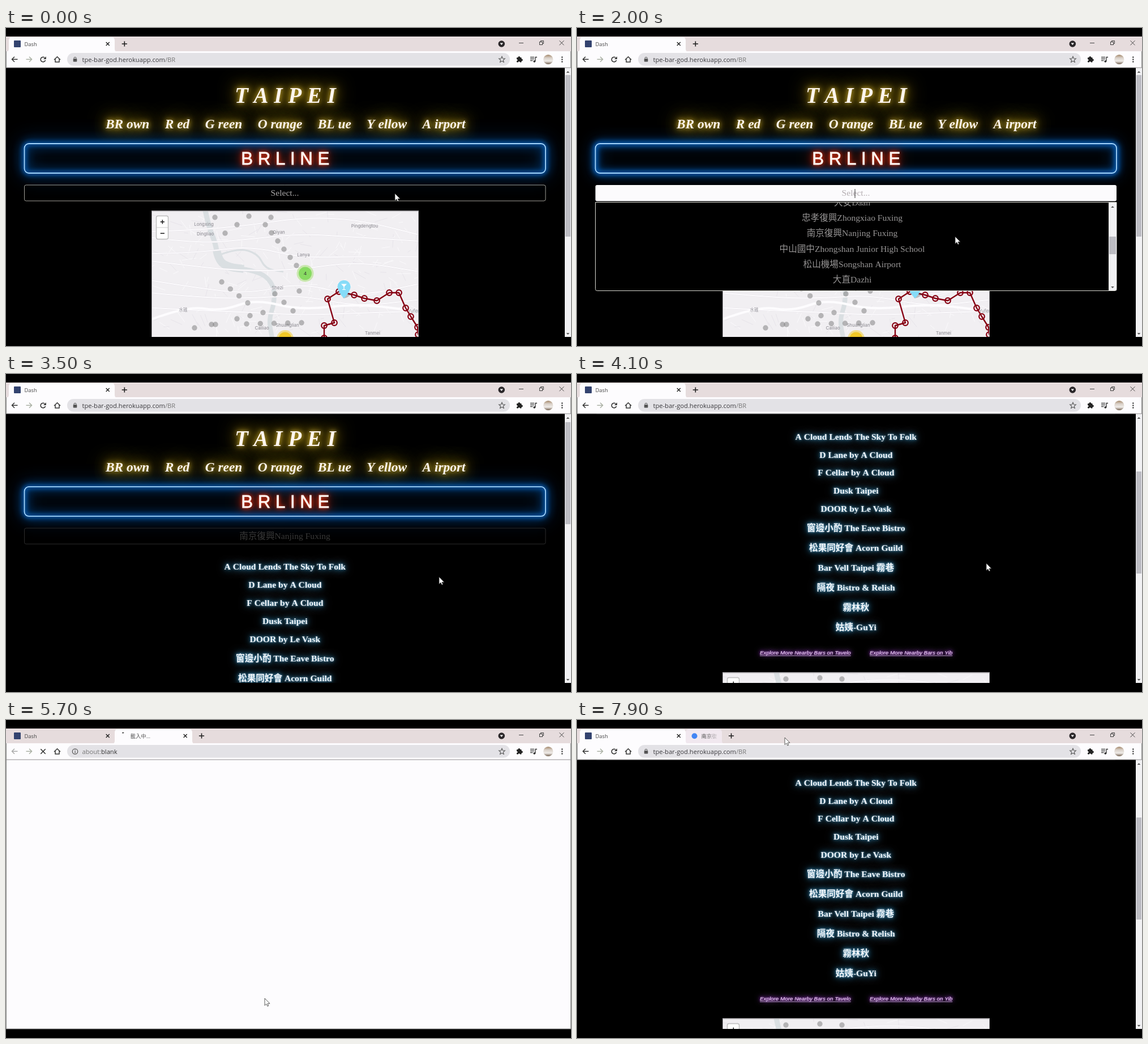
Animation of 998x561 px, one loop 8000 ms. Source, as an HTML page with a canvas:

```html
<!DOCTYPE html>
<html lang="zh-Hant">
<head>
<meta charset="utf-8">
<title>Dash</title>
<style>
html, body { margin: 0; width: 100%; height: 100%; overflow: hidden; background: #000; }
canvas { display: block; width: 998px; height: 561px; }
</style>
</head>
<body>
<canvas id="stage" width="998" height="561"></canvas>
<script>
const stage = document.getElementById('stage').getContext('2d');
let c = stage;

const LOOP = 8000;
const OPEN = 500, PICK = 2400, LISTED = 3000, NEW_TAB = 5550, LOADED = 6500, CLOSE_TAB = 7800;
const CJK = '"Noto Sans CJK TC", "Noto Sans CJK JP", "Noto Sans CJK", sans-serif';
const SERIF = '"Liberation Serif", ' + CJK;
const UI = '"Open Sans", ' + CJK;
const MID = 493.3, ROW = 27.3, MENU_TOP = 308;

const stations = ['動物園Taipei Zoo', '木柵Muzha', '萬芳社區Wanfang Community', '萬芳醫院Wanfang Hospital',
  '辛亥Xinhai', '麟光Linguang', '六張犁Liuzhangli', '科技大樓Technology Building', '大安Daan',
  '忠孝復興Zhongxiao Fuxing', '南京復興Nanjing Fuxing', '中山國中Zhongshan Junior High School',
  '松山機場Songshan Airport', '大直Dazhi', '劍南路Jiannan Rd.', '西湖Xihu', '港墘Gangqian', '文德Wende',
  '內湖Neihu', '大湖公園Dahu Park', '葫洲Huzhou', '東湖Donghu', '南港軟體園區Nangang Software Park',
  '南港展覽館Taipei Nangang Exhibition Center'];
const bars = ['A Cloud Lends The Sky To Folk', 'D Lane by A Cloud', 'F Cellar by A Cloud', 'Dusk Taipei',
  'DOOR by Le Vask', '窗邊小酌 The Eave Bistro', '松果同好會 Acorn Guild', 'Bar Vell Taipei 霧巷',
  '隔夜 Bistro & Relish', '霧林秋', '姑姨-GuYi'];
const lines = ['BR own', 'R ed', 'G reen', 'O range', 'BL ue', 'Y ellow', 'A irport'];

const GOLD = [[34, '#c8a000'], [20, '#c8a000'], [9, '#d8b838']];
const RED = [[26, '#e02000'], [14, '#ff2a08'], [6, '#ff3a14']];
const BLUE = [[15, '#0e6a9c'], [8, '#2f7ea8'], [3, '#6fa6c4']];
const PURPLE = [[11, '#9010d0'], [6, '#b040e8'], [3, '#b858e0']];

// Pointer moves: start, end, x, y
const moves = [[550, 900, 668, 368], [2500, 3350, 765, 358], [3550, 4100, 723, 334],
  [4400, 5300, 457, 491], [6600, 7600, 318, 30], [7720, 7900, 367, 31]];

function ease(t, from, to) {
  const u = Math.min(1, Math.max(0, (t - from) / (to - from)));
  return u * u * (3 - 2 * u);
}

// Sum of smooth wheel notches, 200 ms each
const wheel = (t, step, times) => times.reduce((sum, s) => sum + step * ease(t, s, s + 200), 0);
const menuScroll = t => wheel(t, 77.5, [1000, 1350, 1700]);
const pageScroll = t => wheel(t, 78.3, [3470, 3670, 3870]);

function rect(x, y, w, h, fill) { c.fillStyle = fill; c.fillRect(x, y, w, h); }

function round(x, y, w, h, r, fill, stroke, lw = 1) {
  c.beginPath(); c.roundRect(x, y, w, h, r);
  if (fill) { c.fillStyle = fill; c.fill(); }
  if (stroke) { c.strokeStyle = stroke; c.lineWidth = lw; c.stroke(); }
}

function disc(x, y, r, fill) { c.beginPath(); c.arc(x, y, r, 0, 7); c.fillStyle = fill; c.fill(); }

function arc(x, y, r, from, to, color, lw) {
  c.beginPath(); c.arc(x, y, r, from, to); c.strokeStyle = color; c.lineWidth = lw; c.stroke();
}

function line(color, lw, ...p) {
  c.beginPath();
  for (let i = 0; i < p.length; i += 2) c.lineTo(p[i], p[i + 1]);
  c.strokeStyle = color; c.lineWidth = lw; c.stroke();
}

function poly(fill, ...p) {
  c.beginPath();
  for (let i = 0; i < p.length; i += 2) c.lineTo(p[i], p[i + 1]);
  c.closePath(); c.fillStyle = fill; c.fill();
}

// Smooth line through a few points
function bend(color, lw, ...p) {
  c.beginPath(); c.moveTo(p[0], p[1]);
  let i = 2;
  for (; i < p.length - 2; i += 2)
    c.quadraticCurveTo(p[i], p[i + 1], (p[i] + p[i + 2]) / 2, (p[i + 1] + p[i + 3]) / 2);
  c.lineTo(p[i], p[i + 1]);
  c.strokeStyle = color; c.lineWidth = lw; c.stroke();
}

function text(s, x, y, font, fill, align = 'left') {
  c.font = font; c.textAlign = align; c.fillStyle = fill; c.fillText(s, x, y);
}

// Draws only the shadows of a shape: the shape itself is moved off the stage
function halo(list, paint) {
  c.save();
  c.shadowOffsetX = 2000;
  c.translate(-2000, 0);
  for (const [blur, color] of list) { c.shadowBlur = blur; c.shadowColor = color; paint(); }
  c.restore();
}

function glow(s, x, y, font, fill, align, list) {
  halo(list, () => text(s, x, y, font, '#fff', align));
  text(s, x, y, font, fill, align);
}

function cross(x, y, r, color, lw) {
  line(color, lw, x - r, y - r, x + r, y + r);
  line(color, lw, x + r, y - r, x - r, y + r);
}

function plus(x, y, r, lw) {
  line('#222', lw, x - r, y, x + r, y);
  line('#222', lw, x, y - r, x, y + r);
}

function drawMap() {
  const img = document.createElement('canvas');
  img.width = 472; img.height = 223;
  c = img.getContext('2d');
  c.translate(-257, -322);
  c.lineJoin = 'round';
  rect(257, 322, 472, 223, '#f1eff2');
  let seed = 11;
  const rnd = () => (seed = seed * 16807 % 2147483647) / 2147483647;
  for (let i = 0; i < 260; i++) {
    const x = 257 + rnd() * 472, y = 325 + rnd() * 220, a = rnd() * 6.3, l = 6 + rnd() * 20;
    line(i % 3 ? '#fbfafc' : '#e7e4ea', 1, x, y, x + Math.cos(a) * l, y + Math.sin(a) * l);
  }
  const water = '#dadfe2';
  bend(water, 9, 352, 322, 358, 350, 370, 380, 374, 405);
  bend(water, 14, 372, 392, 376, 412, 395, 422, 420, 425);
  bend(water, 8, 405, 423, 445, 428, 472, 450, 475, 482, 464, 515, 470, 546);
  bend(water, 3, 378, 400, 410, 388, 445, 398, 458, 425, 490, 430);
  for (let i = 0; i < 7; i++) {
    const y = 345 + i * 28, w = () => y + rnd() * 40 - 20;
    const road = [257, w(), 340, w(), 430, w(), 520, w(), 620, w(), 730, w()];
    bend('#e6e2e8', 3, ...road); bend('#fcfbfd', 2, ...road);
  }
  bend('#fdfcfe', 4, 257, 514, 320, 490, 380, 500, 440, 478, 520, 498, 620, 486, 730, 500);

  const label = (s, x, y) => text(s, x, y, '500 7.8px Inter, ' + CJK, '#95939a', 'center');
  label('Longxing', 349.5, 349); label('Dingliao', 352, 366); label('Qiyan', 482, 363);
  label('Lanya', 525.5, 403); label('Shezi', 479.5, 461); label('Pingdengtou', 633.5, 352);
  label('水碓', 313, 500); label('Cailiao', 452, 532); label('Shuanglian', 497, 527);
  label('Tanmei', 647.5, 541); label('Yufeng', 723, 502);

  // Evenly spaced stops between two points
  const chain = (n, x0, y0, x1, y1) => {
    for (let i = 0; i < n; i++) {
      const u = i / (n - 1);
      disc(x0 + (x1 - x0) * u, y0 + (y1 - y0) * u, 4.7, 'rgba(120,120,120,.5)');
    }
  };
  chain(2, 369, 334, 468, 334);
  chain(3, 387, 362, 429, 332);
  chain(6, 458, 347, 513, 419);
  chain(4, 381, 448, 427, 485);
  chain(3, 454, 502, 408, 513);
  chain(3, 475, 469, 507, 499);
  chain(2, 333, 529, 518, 464);
  chain(2, 363, 523, 370, 523);
  chain(5, 425, 522, 522, 520);

  const track = [562, 547, 562, 525, 580, 520, 568, 478, 588, 465, 615, 471, 633, 477, 655, 481, 677, 467,
    694, 467, 706, 494, 715, 509, 727, 528, 728, 541];
  line('#860012', 2.4, ...track);
  for (let i = 0; i < track.length; i += 2) arc(track[i], track[i + 1], 4.8, 0, 7, '#860012', 2.2);

  const cluster = (x, y, outer, inner) => { disc(x, y, 15, outer); disc(x, y, 11.5, inner); };
  cluster(528.5, 433, 'rgba(181,226,140,.65)', 'rgba(125,216,85,.85)');
  text('4', 528.5, 436, '9px "Liberation Sans", sans-serif', '#333', 'center');
  cluster(493, 548, 'rgba(241,211,87,.65)', 'rgba(240,194,12,.8)');

  c.beginPath(); c.ellipse(602, 472, 8, 3, -.5, 0, 7); c.fillStyle = 'rgba(0,0,0,.22)'; c.fill();
  c.beginPath(); c.arc(597, 456.5, 11.5, Math.PI * .87, Math.PI * .13);
  c.quadraticCurveTo(605, 469, 597, 477); c.quadraticCurveTo(589, 469, 586.4, 461);
  c.fillStyle = '#86dcf8'; c.fill();
  poly('#fff', 592, 451.5, 602, 451.5, 597, 457);
  rect(596.4, 456, 1.2, 5, '#fff'); rect(594, 461, 6, 1, '#fff');

  round(265.5, 331.5, 21, 41, 3, '#fff', '#bcbcbc', 1.4);
  line('#ccc', 1, 266, 352, 286, 352);
  plus(276.3, 342, 3.6, 1.6);
  line('#222', 1.6, 272.7, 362.3, 279.9, 362.3);
  line('#a4a2a6', 2, 257, 546, 257, 322.5, 729, 322.5, 729, 546);
  c = stage;
  return img;
}

const mapImage = drawMap();

function drawScrollbar(x, y, w, h, top, len) {
  rect(x, y, w, h, '#f1f1f3');
  rect(x + 1, top, w - 2, len, '#bdbdc3');
  const m = x + w / 2;
  poly('#555', m - 2.8, y + 9, m + 2.8, y + 9, m, y + 6);
  poly('#555', m - 2.8, y + h - 7, m + 2.8, y + h - 7, m, y + h - 4);
}

function drawMenu(t) {
  const s = menuScroll(t);
  round(32.5, 277, 920.5, 28.5, 3, '#fcfbfd');
  text('Select...', 492.5, 296, '15.6px ' + SERIF, '#b5aeb2', 'center');
  if (t >= 600 && Math.floor((t - 600) / 500) % 2 === 0) rect(490.5, 284, 1, 16, '#333');
  round(32.5, 307.5, 920.5, 156, [0, 0, 3, 3], '#000', '#d8d8d0');
  c.save();
  c.beginPath(); c.rect(33, MENU_TOP, 906, 155); c.clip();
  const hover = t > 800 && t < 1250 ? 2 : t > 2200 ? 10 : -1;
  stations.forEach((name, i) => {
    const y = MENU_TOP + i * ROW - s;
    if (i === hover) rect(33, y, 906, ROW, '#434343');
    text(name, 486, y + 18.8, '15.6px ' + SERIF, i === hover ? '#b4b2b2' : '#969494', 'center');
  });
  c.restore();
  drawScrollbar(939, 308, 14, 155, 322 + s * .198, 31);
}

function drawHeader(t, open, picked) {
  const pulse = .5 + .5 * Math.cos(t / 3000 * Math.PI * 2);
  glow('T A I P E I', MID, 132.3, 'italic bold 39px ' + SERIF, '#fff6ee', 'center', GOLD);
  const font = 'italic bold 23.4px ' + SERIF;
  let x = 176;
  for (const name of lines) {
    glow(name, x, 177, font, '#fff6ee', 'left', GOLD);
    x += c.measureText(name).width + 27.4;
  }
  const size = .75 + .4 * pulse;
  halo([[30 * size, '#0070e0'], [16 * size, '#0078f0'], [8, '#0a86ff']],
    () => round(32.5, 204, 920.5, 52, 8, null, '#fff', 4));
  round(32.5, 204, 920.5, 52, 8, null, '#a4d4fc', 1.8);
  const sign = '31.2px "Liberation Sans", sans-serif';
  glow('B R L I N E', MID, 241, sign, '#fff4f0', 'center', RED);
  c.strokeStyle = '#fff4f0'; c.lineWidth = .8;
  c.strokeText('B R L I N E', MID, 241);

  if (open) return drawMenu(t);
  round(32.5, 277, 920.5, 28, 3, null, picked ? '#2c2c2c' : '#a09f98');
  text(picked ? stations[10] : 'Select...', 492.5, 296, '15.6px ' + SERIF, picked ? '#383838' : '#a9a7a7', 'center');
}

function drawBars() {
  bars.forEach((name, i) => {
    const y = i < 5 ? 350.5 + i * 31.9 : 512.3 + (i - 5) * 34.85;
    glow(name, MID - .5, y, 'bold 15.6px ' + SERIF, '#f2f6fa', 'center', BLUE);
  });
  const link = (s, x) => {
    glow(s, x, 730, 'italic 9.84px "Liberation Sans", sans-serif', '#f6e6fa', 'left', PURPLE);
    rect(x, 731.5, c.measureText(s).width, .8, '#e4c4f4');
  };
  link('Explore More Nearby Bars on Tavelo', 323);
  link('Explore More Nearby Bars on Yib', 517);
}

function drawPage(t) {
  rect(0, 70, 987, 475, '#000');
  const listed = t >= LISTED, picked = t >= PICK, open = t >= OPEN && !picked;
  const s = pageScroll(t);
  c.save();
  c.beginPath(); c.rect(0, 70, 987, 475); c.clip();
  c.translate(0, -s);
  c.drawImage(mapImage, 257, listed ? 761 : 322);
  if (open) rect(250, 300, 500, 164, '#000');
  drawHeader(t, open, picked);
  if (listed) drawBars();
  c.restore();
  drawScrollbar(987, 70, 11, 475, 83 + s * .379, listed ? 180 : 285);
}

function tabShape(x, w, fill) {
  c.beginPath();
  c.moveTo(x - 5, 42); c.quadraticCurveTo(x, 42, x, 37); c.lineTo(x, 22);
  c.quadraticCurveTo(x, 16, x + 6, 16); c.lineTo(x + w - 6, 16);
  c.quadraticCurveTo(x + w, 16, x + w, 22); c.lineTo(x + w, 37);
  c.quadraticCurveTo(x + w, 42, x + w + 5, 42);
  c.fillStyle = fill; c.fill();
}

function drawTabs(t, blank) {
  rect(0, 15, 998, 27, '#e6dcdd');
  const closing = t >= CLOSE_TAB;
  const extra = t < NEW_TAB ? 0 : 137 - 73 * Math.min(1, Math.max(0, (t - CLOSE_TAB) / 100));
  if (extra) tabShape(192, extra, closing ? '#f1e8ef' : '#fdfcfe');
  if (!blank) tabShape(5, 187, '#fdfcfe');
  round(14, 22, 12, 12, 1, '#33436f');
  text('Dash', 32.5, 31.6, '9.4px ' + UI, '#444');
  cross(179.7, 28, 3, '#222', 1.4);
  if (extra) {
    if (t < LOADED) {
      const a = -1.9 + (t - 5700) / 160;
      arc(207, 28, 5.5, a, a + .55, '#222', 1.5);
    } else disc(207.5, 28.3, 5, '#4285f4');
    const end = 184 + extra;
    c.save();
    c.beginPath(); c.rect(219, 18, end - 219, 20); c.clip();
    const fade = c.createLinearGradient(end - 18, 0, end, 0);
    fade.addColorStop(0, '#555'); fade.addColorStop(1, 'rgba(85,85,85,.1)');
    text(t < LOADED ? '載入中...' : '南京復興', 219.5, 31.6, '9.4px ' + UI, fade);
    c.restore();
    if (!closing) cross(316.7, 28, 3, '#222', 1.4);
  }
  plus(extra ? 208.5 + extra : 209.3, 28, 4.6, 1.6);
  disc(875.3, 28, 5.8, '#2a2729');
  poly('#fff', 872.5, 26.6, 878.1, 26.6, 875.3, 30);
  line('#444', 1, 906, 26.5, 914, 26.5);
  c.strokeStyle = '#444'; c.lineWidth = 1;
  c.strokeRect(942.5, 24.5, 5, 5);
  line('#444', 1, 944.5, 24, 944.5, 22.5, 949.5, 22.5, 949.5, 27.5, 948, 27.5);
  cross(981.5, 26.3, 4, '#444', 1);
}

function arrow(x, dir, color) {
  line(color, 1.5, x - 5 * dir, 55.3, x + 5 * dir, 55.3);
  line(color, 1.5, x + .5 * dir, 50.8, x + 5 * dir, 55.3, x + .5 * dir, 59.8);
}

function drawToolbar(blank) {
  rect(0, 41, 998, 29, '#fdfcfe');
  arrow(15.5, -1, blank ? '#aaa' : '#333');
  arrow(40.5, 1, '#aab0a4');
  if (blank) cross(65.5, 55.5, 4.2, '#333', 1.6);
  else {
    arc(65.5, 55.5, 4.3, .3, 5.4, '#333', 1.6);
    poly('#333', 70.8, 50.3, 70.8, 55, 66, 55);
  }
  line('#333', 1.5, 85, 56, 90.5, 50.8, 96, 56);
  line('#333', 1.5, 87, 54.6, 87, 60, 94, 60, 94, 54.6);
  round(108, 44, 782, 22.6, 11.3, '#e3e2e6');
  const font = '11.15px ' + UI;
  const [head, tail] = blank ? ['about:', 'blank'] : ['tpe-bar-god.herokuapp.com', '/BR'];
  text(head, 134.5, 59.5, font, blank ? '#777' : '#3c3b3f');
  text(tail, 134.5 + c.measureText(head).width, 59.5, font, blank ? '#333' : '#777');
  if (blank) {
    arc(122, 55.5, 4.7, 0, 7, '#555', 1.2);
    rect(121.4, 55, 1.3, 3.2, '#555'); rect(121.4, 52.6, 1.3, 1.3, '#555');
  } else {
    round(118.7, 54, 6.6, 5.6, .8, '#555');
    arc(122, 53.5, 2, Math.PI, 0, '#555', 1.1);
  }
  c.beginPath();
  for (let i = 0; i < 10; i++) {
    const r = i % 2 ? 2.5 : 5.6, a = i * Math.PI / 5 - Math.PI / 2;
    c.lineTo(876 + r * Math.cos(a), 55.8 + r * Math.sin(a));
  }
  c.closePath(); c.strokeStyle = '#555'; c.lineWidth = 1.1; c.stroke();

  round(902, 52, 8.6, 8.6, 1, '#222');
  disc(906.3, 51.8, 1.9, '#222'); disc(910.9, 56.3, 1.9, '#222');
  disc(902.1, 56.6, 1.5, '#fdfcfe'); disc(906.3, 60.4, 1.5, '#fdfcfe');
  for (let i = 0; i < 3; i++) line('#333', 1.3, 926, 51.5 + i * 3, i < 2 ? 933 : 930.5, 51.5 + i * 3);
  disc(933.3, 58.8, 1.9, '#333');
  line('#333', 1.3, 935, 59, 935, 51.5, 938, 51.5);
  const photo = c.createLinearGradient(0, 47, 0, 64);
  ['#a38668', '#d9d0c8', '#efebe8', '#73604f'].forEach((color, i) => photo.addColorStop(i / 3, color));
  disc(957.8, 55.5, 8.6, photo);
  for (let i = -1; i < 2; i++) disc(982.3, 55.5 + i * 4, 1.2, '#333');
}

function drawPointer(t) {
  let x = 687, y = 292;
  for (const [from, to, nx, ny] of moves) {
    const u = ease(t, from, to);
    x += (nx - x) * u; y += (ny - y) * u;
  }
  c.save();
  c.translate(x, y);
  poly('#fff', 0, 0, 0, 12.6, 2.9, 9.9, 4.8, 14, 6.8, 13.2, 5, 9.2, 9, 9.2);
  c.strokeStyle = '#333'; c.lineWidth = .8; c.stroke();
  c.restore();
}

function draw(t) {
  const blank = t >= NEW_TAB && t < CLOSE_TAB;
  rect(0, 0, 998, 561, '#000');
  if (blank) rect(0, 70, 998, 475, '#fdfcfe');
  else drawPage(t);
  drawTabs(t, blank);
  drawToolbar(blank);
  rect(0, 69.5, 998, 1, '#8f8d90');
  const bottom = blank ? 545 : 70;
  rect(0, 41, 1, bottom - 41, '#888');
  rect(997, 41, 1, bottom - 41, '#888');
  if (blank) rect(0, 544.5, 998, 1, '#777');
  drawPointer(t);
}

function frame() {
  draw(performance.now() % LOOP);
  requestAnimationFrame(frame);
}
frame();
</script>
</body>
</html>
```
